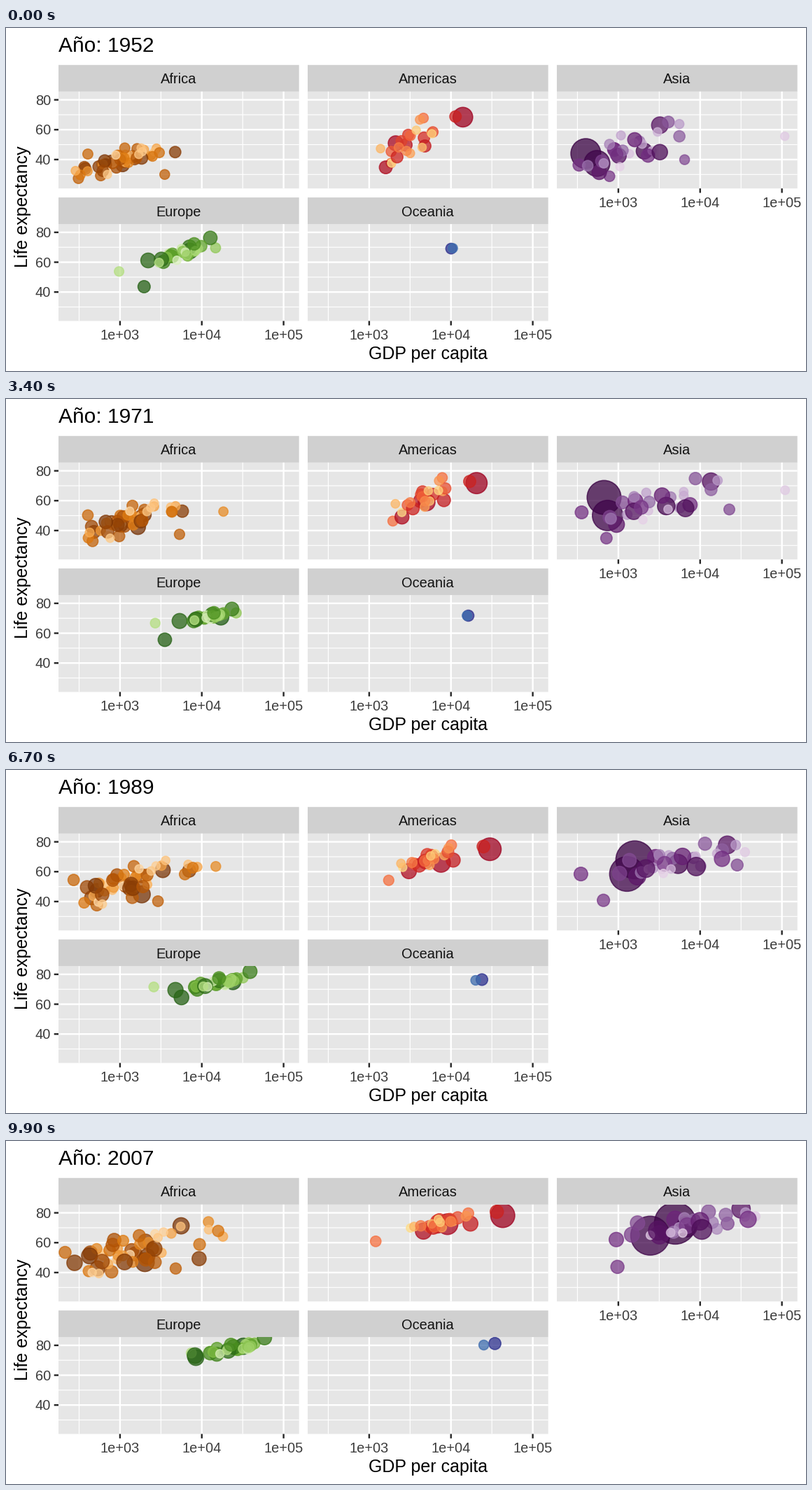
A matplotlib script that plays this animation: 1143x490 px, repeating every 10 s.

```python
import numpy as np
import matplotlib.pyplot as plt
from matplotlib.animation import FuncAnimation
from matplotlib.colors import to_rgb
from matplotlib.patches import Rectangle

W, H, DPI = 1143, 490, 100
FRAMES, INTERVAL = 100, 100
START, END = 1952, 2007
PROGRESS = np.linspace(0, 1, FRAMES)
YEARS = START + (END - START) * PROGRESS

PANEL_W, PANEL_H, STRIP_H = 343.7, 138.4, 38
LEFT, TOP, STEP_X, STEP_Y = 75, 90.8, 356, 189.3
DECADE, LIFE_UNIT = 116.85, 2.133
POP_MAX = 1318.7
ALPHA = 0.74

plt.rcParams["font.family"] = "Liberation Sans"


def pt(px):
    return px * 72 / DPI


def gdp_x(log_gdp, col):
    return 162.9 + STEP_X * col + (log_gdp - 3) * DECADE


def life_y(life, row):
    return 102.6 + STEP_Y * row + (80 - life) * LIFE_UNIT


def tween(years, values):
    return np.interp(YEARS, years, values)


def radius(pop_start, pop_end):
    """Bubble area follows population in millions."""
    shares = np.sqrt(np.array([pop_start, pop_end]) / POP_MAX)
    return 2.42 * (2 + 10 * tween((START, END), shares)) + 0.8


class Continent:
    def __init__(self, name, col, row, ramp):
        self.name, self.col, self.row = name, col, row
        self.stops = np.array([to_rgb("#" + c) for c in ramp.split()]) ** 1.1
        self.x, self.y, self.r, self.shades = [], [], [], []

    def add(self, shade, pops, log_gdp, life):
        self.x.append(gdp_x(log_gdp, self.col))
        self.y.append(life_y(life, self.row))
        self.r.append(radius(*pops))
        self.shades.append(shade)

    def bubble(self, shade, pops, *path):
        """One country along a path of (year, gdp, life) points."""
        years, gdp, life = zip(*path)
        self.add(shade, pops, tween(years, np.log10(gdp)), tween(years, life))

    def crowd(self, count, seed, first_shade, top_pop, growth, link, *trend):
        """Correlated cloud; trend points are (year, gdp, spread, life, spread)."""
        rng = np.random.default_rng(seed)
        z = rng.normal(size=(4, count))
        z -= z.mean(axis=1, keepdims=True)
        z = (z / z.std(axis=1, keepdims=True)).clip(-1.9, 1.9)
        years, gdp, gdp_sd, life, life_sd = zip(*trend)
        gdp, gdp_sd = tween(years, np.log10(gdp)), tween(years, gdp_sd)
        life, life_sd = tween(years, life), tween(years, life_sd)
        turn = 0.7 * PROGRESS
        shades = rng.permutation(np.linspace(first_shade, 1, count))
        for shade, (a, b, c, d) in zip(shades, z.T):
            wealth = a * np.cos(turn) + b * np.sin(turn)
            luck = c * np.cos(turn) + d * np.sin(turn)
            health = link * wealth + np.sqrt(1 - link ** 2) * luck
            pop = top_pop * (1 - shade) ** 3 + 0.3
            self.add(shade, (pop / growth, pop), gdp + gdp_sd * wealth, life + life_sd * health)

    def colours(self):
        at = np.array(self.shades) * (len(self.stops) - 1)
        rgb = [np.interp(at, range(len(self.stops)), band) for band in self.stops.T]
        return np.column_stack(rgb + [np.full(len(at), ALPHA)])

    def state(self, i):
        x, y, r = (np.array(rows)[:, i] for rows in (self.x, self.y, self.r))
        return np.column_stack([x, y]), pt(2 * r) ** 2


africa = Continent("Africa", 0, 0, "7F3B08 B35806 E08214 FDB863 FEE0B6")
americas = Continent("Americas", 1, 0, "A50026 D73027 F46D43 FDAE61 FEE090")
asia = Continent("Asia", 2, 0, "40004B 762A83 9970AB C2A5CF E7D4E8")
europe = Continent("Europe", 0, 1, "276419 4D9221 7FBC41 B8E186 E6F5D0")
oceania = Continent("Oceania", 1, 1, "313695 4575B4")
CONTINENTS = (africa, americas, asia, europe, oceania)

# Nigeria, Egypt, Congo, South Africa, Libya, Angola
africa.bubble(0, (33, 135), (1952, 1077, 36.3), (1972, 1698, 42.8), (2007, 2014, 46.9))
africa.bubble(.02, (22, 80), (1952, 1419, 41.9), (1972, 2024, 51.1), (2007, 5581, 71.3))
africa.bubble(.06, (14, 65), (1952, 781, 39.1), (1977, 796, 47.8), (2007, 278, 46.5))
africa.bubble(.08, (14, 44), (1952, 4725, 45), (1992, 7225, 61.9), (2007, 9270, 49.3))
africa.bubble(.58, (1, 6), (1952, 2388, 42.7), (1968, 19000, 51), (2007, 12057, 74))
africa.bubble(.35, (4, 12), (1952, 3521, 30), (1972, 5473, 37.9), (1992, 2628, 40.6), (2007, 4797, 42.7))
africa.crowd(46, 4, .04, 85, 3.5, .5,
             (1952, 930, .27, 39, 4.8), (1972, 1200, .28, 47, 6),
             (1992, 1250, .36, 53.5, 7.5), (2007, 1500, .42, 54.5, 8.2))

# United States, Canada, Brazil, Haiti
americas.bubble(0, (158, 301), (1952, 13990, 68.4), (2007, 42952, 78.2))
americas.bubble(.21, (15, 33), (1952, 11367, 68.8), (2007, 36319, 80.7))
americas.bubble(.04, (57, 190), (1952, 2109, 50.9), (1977, 6660, 61.5), (2007, 9066, 72.4))
americas.bubble(.54, (3, 8.5), (1952, 1840, 37.6), (1982, 2011, 51.5), (2007, 1202, 60.9))
americas.crowd(21, 8, .08, 100, 2.8, .6,
               (1952, 3160, .19, 51.5, 8), (1972, 4800, .19, 62.5, 6),
               (1992, 5400, .2, 69.5, 3.8), (2007, 7400, .22, 73.1, 3))

# China, India, Japan, Kuwait, Afghanistan, Myanmar, Saudi Arabia
asia.bubble(0, (556, 1318.7), (1952, 400, 44), (1957, 576, 50.5), (1972, 677, 63.1),
            (1987, 1379, 67.3), (2007, 4959, 73))
asia.bubble(.03, (372, 1110), (1952, 547, 37.4), (1977, 813, 54.2), (2007, 2452, 64.7))
asia.bubble(.15, (87, 127), (1952, 3217, 63), (1972, 14779, 73.4), (2007, 31656, 82.6))
asia.bubble(.97, (.2, 2.5), (1952, 108382, 55.6), (1972, 109348, 67.7), (1982, 31354, 71.3), (2007, 47307, 77.6))
asia.bubble(.33, (8, 32), (1952, 779, 28.8), (1992, 649, 41.7), (2007, 975, 43.8))
asia.bubble(.3, (20, 48), (1952, 331, 36.3), (1972, 357, 53.1), (1992, 347, 59.3), (2007, 944, 62.1))
asia.bubble(.4, (4, 28), (1952, 6460, 39.9), (1977, 34168, 58.7), (2007, 21655, 72.8))
asia.crowd(26, 5, .06, 220, 2.5, .7,
           (1952, 1500, .3, 47.5, 8.5), (1972, 3100, .4, 59, 8),
           (1992, 5300, .43, 68, 6), (2007, 7600, .44, 72, 5.2))

# Germany, Turkey, Bosnia, Switzerland
europe.bubble(0, (69, 82), (1952, 7144, 67.5), (1972, 18016, 71), (2007, 32170, 79.4))
europe.bubble(.03, (22, 71), (1952, 1969, 43.6), (1977, 4269, 59.5), (2007, 8458, 71.8))
europe.bubble(.76, (2.8, 4.6), (1952, 974, 53.8), (1972, 2860, 67.5), (1992, 2547, 72.2), (2007, 7446, 74.9))
europe.bubble(.62, (4.8, 7.6), (1952, 14734, 69.6), (1972, 27195, 73.8), (2007, 37506, 81.7))
europe.crowd(26, 2, .06, 80, 1.25, .85,
             (1952, 5300, .2, 65.8, 4), (1972, 12000, .15, 71.2, 1.7),
             (1992, 15000, .22, 74.5, 2.8), (2007, 24000, .2, 77.8, 2.5))

# Australia, New Zealand
oceania.bubble(0, (8.7, 20), (1952, 10040, 69.1), (1972, 16789, 71.9), (2007, 34435, 81.2))
oceania.bubble(1, (2, 4), (1952, 10557, 69.4), (1972, 16046, 71.9), (2007, 25185, 80.2))

fig = plt.figure(figsize=(W / DPI, H / DPI), dpi=DPI, facecolor="white")
ax = fig.add_axes([0, 0, 1, 1])
ax.set(xlim=(0, W), ylim=(H, 0))
ax.axis("off")


def label(x, y, text, size, colour="black", ha="center", **kw):
    return ax.text(x, y, text, fontsize=pt(size), color=colour, ha=ha, va="baseline", **kw)


def line(x0, y0, x1, y1, width, colour="white"):
    ax.plot([x0, x1], [y0, y1], color=colour, lw=pt(width), snap=False,
            solid_capstyle="butt", zorder=2)


def box(x, y, h, colour):
    return ax.add_patch(Rectangle((x, y), PANEL_W, h, fc=colour, ec="none", lw=0, snap=False))


def draw_panel(c):
    x, y = LEFT + STEP_X * c.col, TOP + STEP_Y * c.row
    right, bottom = x + PANEL_W, y + PANEL_H
    panel = box(x, y, PANEL_H, "#e6e6e6")
    box(x, y - STRIP_H, STRIP_H, "#d0d0d0")
    label(x + PANEL_W / 2, y - 11.4, c.name, 20, "#121212")

    for width, lives, logs in ((1.2, (30, 50, 70), (2.5, 3.5, 4.5)),
                               (2.4, (40, 60, 80), (3, 4, 5))):
        for life in lives:
            line(x, life_y(life, c.row), right, life_y(life, c.row), width)
        for log in logs:
            line(gdp_x(log, c.col), y, gdp_x(log, c.col), bottom, width)

    if c.col == 0:
        for life in (40, 60, 80):
            ly = life_y(life, c.row)
            line(x - 6.3, ly, x, ly, 2.4, "#262626")
            label(64, ly + 7.2, str(life), 20, "#3c3c3c", "right")
    if c.row == 1 or c.col == 2:
        for log in (3, 4, 5):
            gx = gdp_x(log, c.col)
            line(gx, bottom, gx, bottom + 6.3, 2.4, "#262626")
            label(gx, bottom + 26.6, f"1e+0{log}", 20, "#3c3c3c")

    colours = c.colours()
    offsets, sizes = c.state(0)
    dots = ax.scatter(*offsets.T, s=sizes, facecolors=colours, edgecolors=colours,
                      linewidths=pt(1.6), zorder=3)
    dots.set_clip_path(panel)
    return dots


clouds = [draw_panel(c) for c in CONTINENTS]
title = label(LEFT, 34.3, "", 30, ha="left")
label(602.8, 473, "GDP per capita", 25)
label(31, 254.7, "Life expectancy", 25, rotation=90, rotation_mode="anchor")


def update(i):
    title.set_text(f"Año: {round(YEARS[i])}")
    for c, dots in zip(CONTINENTS, clouds):
        offsets, sizes = c.state(i)
        dots.set_offsets(offsets)
        dots.set_sizes(sizes)
    return [title, *clouds]


anim = FuncAnimation(fig, update, frames=FRAMES, interval=INTERVAL, repeat=True, repeat_delay=0)
plt.show()
```
